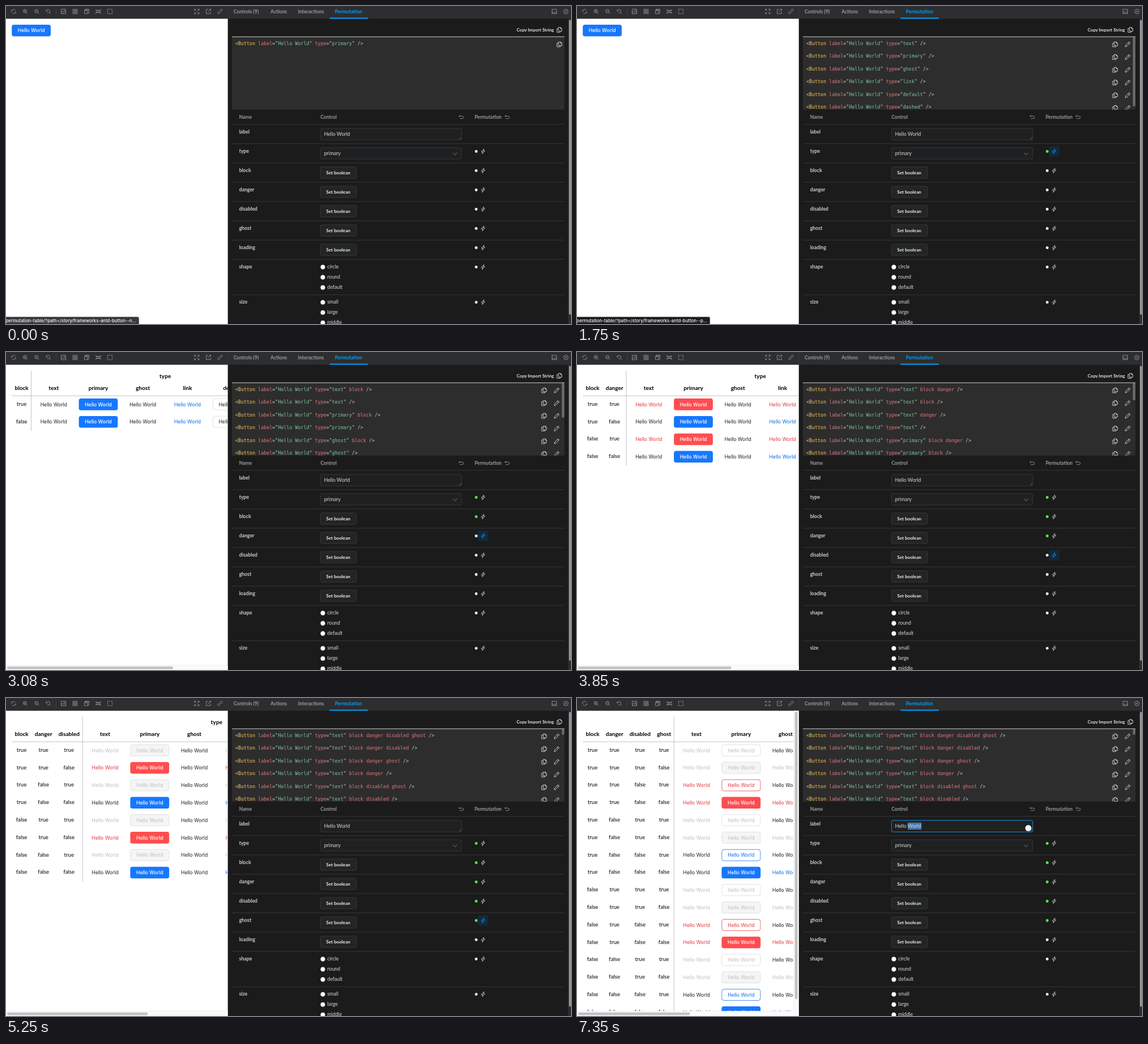
An HTML page that plays this animation: 998 px wide and 561 px high, repeating every 8000 ms.

```html
<!DOCTYPE html>
<html lang="en">
<head>
<meta charset="utf-8">
<title>Permutation table</title>
<style>
  html, body { margin: 0; height: 100%; overflow: hidden; background: #1b1b1b; }
  svg { display: block; }
  #stage { width: 100vw; height: 100vh; }
  text { white-space: pre; font-family: Lato, sans-serif; }
  .tab { font-size: 8.6px; font-weight: 700; fill: #9a9c9d; }
  .name { font-size: 8.8px; font-weight: 700; fill: #c9cccf; }
  .value { font-size: 8.75px; fill: #d8dadb; }
  .small { font-size: 8.1px; font-weight: 700; fill: #eeeeee; }
  .copy { font-size: 7.87px; font-weight: 700; fill: #e4e4e4; }
  .head { font-size: 10.15px; font-weight: 700; text-anchor: middle; }
  .cell { font-size: 9.7px; text-anchor: middle; }
  .button { font: 8.65px Inter, sans-serif; text-anchor: middle; }
  .code { font: 8.36px "DejaVu Sans Mono", monospace; fill: #cccccc; }
  .status { font: 500 7.75px Inter, sans-serif; fill: #ffffff; text-anchor: end; }
  .tag { fill: #f8c555; } .attr { fill: #e2777a; } .string { fill: #7ec699; }
</style>
</head>
<body>
<svg id="stage" viewBox="0 0 998 561" preserveAspectRatio="none">
  <g id="fixed"></g>
  <g id="live"></g>
</svg>
<script>
const LOOP = 8000;
const TYPES = ['text', 'primary', 'ghost', 'link', 'default', 'dashed'];
const FLAGS = ['block', 'danger', 'disabled', 'ghost'];
const ROWS = ['type', ...FLAGS, 'loading', 'shape', 'size'];
const BLUE = '#1677ff', RED = '#ff4d4f', LINK = '#0f6be6', ERROR = '#e03a3e';
const FAINT = '#bfbfbf', EDGE = '#d9d9d9', ACCENT = '#029cfd';

const ICONS = {
  sync: 'M-3.7-.6A3.7 3.7 0 0 1 2.9-2.3M3.7 .6A3.7 3.7 0 0 1-2.9 2.3M-4.6-1.8L-3.7-.4-2.2-1.2M4.6 1.8L3.7 .4 2.2 1.2',
  zoomIn: 'M2.3-.7A3 3 0 1 1-3.7-.7A3 3 0 1 1 2.3-.7M1.5 1.5L4 4M-2.2-.7H.8M-.7-2.2V.8',
  zoomOut: 'M2.3-.7A3 3 0 1 1-3.7-.7A3 3 0 1 1 2.3-.7M1.5 1.5L4 4M-2.2-.7H.8',
  zoomReset: 'M-3.6-1A3 3 0 1 1-2.2 1.9M1.5 1.5L4 4M-4.2-3.4V-.9H-1.7',
  image: 'M-4-4H4V4H-4ZM-4 2.5L-1.5-.3 .5 1.5 2 .3 4 2.2M1-2H2V-1H1Z',
  grid: 'M-3.9-3.9H-.8V-.8H-3.9ZM.8-3.9H3.9V-.8H.8ZM-3.9 .8H-.8V3.9H-3.9ZM.8 .8H3.9V3.9H.8Z',
  viewport: 'M-3-3.9H3.9V3H1.5M-3.9-1.5H1.4V3.9H-3.9ZM-3-3.9V-1.5M-3-2.8H3.9',
  measure: 'M-4-4V-1.6H4V-4M-4 4V1.4H4V4M-4-1.6H4M-4 1.4H4',
  expand: 'M-4-1.5V-4H-1.5M1.5-4H4V-1.5M4 1.5V4H1.5M-1.5 4H-4V1.5M-4-4L-1.2-1.2M4-4L1.2-1.2M4 4L1.2 1.2M-4 4L-1.2 1.2',
  share: 'M-.5-3.8H-3.8V3.8H3.8V.5M1.3-4H4V-1.3M4-4L-.8 .8',
  link: 'M-.6-1.8L1.2-3.6A1.7 1.7 0 0 1 3.6-1.2L1.8 .6M.6 1.8L-1.2 3.6A1.7 1.7 0 0 1-3.6 1.2L-1.8-.6M-1.4 1.4L1.4-1.4',
  panel: 'M-4-3.8H4V3.8H-4ZM-4 1.5H4',
  close: 'M4 0A4 4 0 1 1-4 0A4 4 0 1 1 4 0M-1.6-1.6L1.6 1.6M1.6-1.6L-1.6 1.6',
  copy: 'M-1.6-4.3H2L4.3-2V2.4H-1.6ZM2-4.3V-2H4.3M-1.6-2.2H-4.3V4.4H1.5V2.4',
  pencil: 'M-4.3 4.3L-3.6 1.5 2.4-4.4 4.4-2.4-1.5 3.6ZM1-3L3-1',
  bolt: 'M1.6-4.3L-3.2 .8H-.4L-1.6 4.3 3.2-.9H.4Z',
  undo: 'M-2-3.5L-3.9-1.6-2 .3M-3.9-1.6H1.8A2.2 2.2 0 0 1 1.8 2.8H-2.4',
  chevron: 'M-3.5-1.8L0 1.8 3.5-1.8'
};

const rect = (x, y, w, h, fill, more = '') =>
  `<rect x="${x}" y="${y}" width="${w}" height="${h}" fill="${fill}" ${more}/>`;
const text = (x, y, str, cls, more = '') =>
  `<text x="${x}" y="${y}" class="${cls}" ${more}>${str}</text>`;
const icon = (name, x, y, color = '#9a9c9d', weight = 0.85) =>
  `<path transform="translate(${x} ${y})" d="${ICONS[name]}" fill="none" stroke="${color}" stroke-width="${weight}"/>`;
const dot = (x, y, r, fill) => `<circle cx="${x}" cy="${y}" r="${r}" fill="${fill}"/>`;
const field = (y, w, h, fill, stroke = '#3d3d3d') =>
  rect(555.5, y, w, h, fill, `rx="2.5" stroke="${stroke}" stroke-width=".8"`);
const rowY = i => i < 7 ? 256.4 + 34 * i : 522.6;

function drawFixed() {
  let out = rect(392, 0, 606, 561, '#1b1b1b') + rect(0, 0, 998, 22.5, '#2c2e2f');

  const tools = { sync: 13.5, zoomIn: 34, zoomOut: 54.5, zoomReset: 75, image: 101.5, grid: 122,
    viewport: 142.5, measure: 163, expand: 337, share: 357.5, link: 378, panel: 968.5, close: 989 };
  for (const name in tools) out += icon(name, tools[name], 9.7);
  out += rect(88, 4, 0.7, 12, '#47494a');
  out += rect(179.5, 5.7, 8, 8, 'none', 'stroke="#9a9c9d" stroke-width=".9" stroke-dasharray="2 1"');
  out += rect(391.6, 0, 0.7, 22.5, '#3a3c3d');

  out += text(402, 12.6, 'Controls (9)', 'tab') + text(467.3, 12.6, 'Actions', 'tab') +
    text(515.8, 12.6, 'Interactions', 'tab') +
    text(581, 12.6, 'Permutation', 'tab', `style="fill:${ACCENT}"`) +
    rect(571.5, 20.5, 67.5, 2, ACCENT);

  out += text(902, 44.8, 'Copy Import String', 'copy') + icon('copy', 977.5, 42, '#e4e4e4');
  out += rect(399, 53.8, 587.5, 128.9, '#2d2d2d') + rect(399, 53.8, 587.5, 0.9, '#dddddd');

  out += text(411.7, 198.6, 'Name', 'tab') + text(555.5, 198.6, 'Control', 'tab') +
    text(827.7, 198.6, 'Permutation', 'tab') + icon('undo', 804, 195.8) + icon('undo', 885, 195.8);
  for (let i = 0; i < 8; i++) out += rect(399, 208.4 + 34.03 * i, 587.5, 0.8, '#3d3d3d');
  out += rect(399, 509, 587.5, 0.8, '#3d3d3d');

  out += text(411.7, 224.8, 'label', 'name');
  ROWS.forEach((name, i) => out += text(411.7, rowY(i) + 2.5, name, 'name'));

  out += field(250, 249.5, 20, '#1f2021') + text(561.7, 262.8, 'primary', 'value') +
    icon('chevron', 793.3, 260.8, '#8a8c8d', 0.9);
  for (let i = 1; i < 6; i++)
    out += field(rowY(i) - 6.4 - 34 + 34, 63.5, 20, '#222425') + text(565.5, rowY(i) + 6.5 - 2, '', 'small') +
      text(565.5, rowY(i) + 6.4, 'Set boolean', 'small');

  const radios = (y, names) => names.forEach((name, i) =>
    out += dot(559.6, y + 18 * i, 4.3, '#767676') + dot(559.6, y + 18 * i, 3.8, '#ffffff') +
      text(567.5, y + 18 * i + 2.7, name, 'value'));
  radios(460.6, ['circle', 'round', 'default']);
  radios(522.7, ['small', 'large', 'middle']);

  out += rect(993, 22.5, 5, 538.5, '#2d2f2f') + rect(994.6, 24.5, 3, 520, '#a6a6a6', 'rx="1.5"');
  return out;
}

// Every true/false combination of the first n flags, last flag changing fastest.
const combos = n => Array.from({ length: 2 ** n }, (_, row) =>
  FLAGS.slice(0, n).map((_, k) => !(row >> (n - 1 - k) & 1)));

function codeLine(type, flags, y) {
  const span = (cls, str) => `<tspan class="${cls}">${str}</tspan>`;
  const prop = (key, value) => ` ${span('attr', key)}="${span('string', value)}"`;
  const extras = flags.map(f => ' ' + span('attr', f)).join('');
  return text(405, y, `&lt;${span('tag', 'Button')}${prop('label', 'Hello World')}${prop('type', type)}${extras} /&gt;`, 'code');
}

function drawCode(count) {
  if (!count) return codeLine('primary', [], 68.8) + icon('copy', 977.5, 67.6, '#e4e4e4');
  const sets = combos(count - 1);
  const lines = TYPES.flatMap(type => sets.map(set => [type, FLAGS.filter((_, k) => set[k])]));
  let out = '';
  lines.slice(0, 6).forEach(([type, flags], i) => {
    const y = 22.45 * i;
    out += codeLine(type, flags, 68.8 + y - 54) +
      icon('copy', 950.5, 67.6 + y - 54, '#e4e4e4') + icon('pencil', 972.7, 67.6 + y - 54, '#e4e4e4');
  });
  const thumb = [0, 122, 60.5, 30, 10, 9.5][count];
  return `<svg y="54" width="998" height="128.7" overflow="hidden">${out}</svg>` +
    rect(981.8, 55, 4.4, thumb, '#6b6b6b', 'rx="1"');
}

function look(type, { danger, disabled, ghost }, ghostShown) {
  const color = disabled ? FAINT : danger ? ERROR : null;
  if (type === 'ghost') {
    if (!ghostShown || ghost) return { ink: '#1f1f1f' };
    type = 'link';
  }
  if (type === 'link') return { ink: color || LINK };
  if (type === 'text') return { ink: color || '#1f1f1f' };
  if (type !== 'primary') return { ink: color || '#1f1f1f', edge: EDGE, dashed: type === 'dashed' };
  if (disabled) return { ink: FAINT, edge: EDGE, fill: ghost ? 'none' : '#f5f5f5' };
  if (ghost) return { ink: color || LINK, edge: color || LINK };
  return { ink: '#ffffff', fill: danger ? RED : BLUE, bold: true };
}

function button(cx, cy, type, flags = {}, ghostShown = false) {
  const { ink, edge = 'none', fill = 'none', dashed, bold } = look(type, flags, ghostShown);
  const inset = edge === 'none' ? 0 : 0.35;
  const box = edge === 'none' && fill === 'none' ? '' :
    rect(cx - 34.4 + inset, cy - 10.3 + inset, 68.8 - 2 * inset, 20.6 - 2 * inset, fill,
      `rx="3.8" stroke="${edge}" stroke-width=".75" ${dashed ? 'stroke-dasharray="2 1.3"' : ''}`);
  return box + text(cx, cy + 3.1, 'Hello World', 'button', `fill="${ink}" ${bold ? 'font-weight="500" style="font-weight:500"' : ''}`);
}

function drawTable(n) {
  const line = [0, 44.5, 87, 135.3, 171.3][n];
  const flagX = [27.6, 66.2, 111.3, 153.7], pitch = 78.75, first = line + 39.8;
  const sets = combos(n);
  let out = rect(10.5, 76.8, 500, 0.8, '#b5b5b5') +
    rect(line - 0.4, 33, 0.8, 44.4 + 30.8 * sets.length, '#b5b5b5');
  for (let k = 0; k < n; k++) out += text(flagX[k], 67.4, FLAGS[k], 'head');
  out += text(first + 2.5 * pitch, 45.6, 'type', 'head');
  TYPES.forEach((type, c) => out += text(first + c * pitch, 67.4, type, 'head'));
  sets.forEach((set, r) => {
    const y = 92.4 + 30.8 * r;
    const flags = Object.fromEntries(set.map((on, k) => [FLAGS[k], on]));
    set.forEach((on, k) => out += text(flagX[k], y + 2.4, on, 'cell'));
    TYPES.forEach((type, c) => {
      const x = first + c * pitch;
      if (x < 430) out += button(x, y, type, flags, n === 4);
    });
  });
  return out;
}

function drawPreview(count) {
  const tall = count === 5, table = count > 1;
  let out = '';
  if (!count) out = button(44.6, 43.2, 'primary');
  else if (!table) TYPES.forEach((type, i) => out += button(44.6, 43.2 + 20.52 * i, type));
  else out = drawTable(count - 1);
  out = rect(0, 22.5, 391.8, 538.5, '#ffffff') +
    `<svg width="${tall ? 382.3 : 391.8}" height="${table ? 552.5 : 561}" overflow="hidden">${out}</svg>`;
  if (table) {
    const thumb = [293, 270.5, 248.5, 197.5][count - 2];
    out += rect(0, 552.5, 391.8, 8.5, '#fafafa') + rect(0, 552.3, 391.8, 0.6, '#e8e8e8') +
      rect(2, 554.8, thumb, 4.8, '#c1c1c1', 'rx="2.4"');
  }
  if (tall) out += rect(382.5, 22.5, 9.3, 530, '#fafafa') + rect(382.3, 22.5, 0.6, 530, '#e8e8e8') +
    rect(384.8, 24.5, 4.8, 507, '#c1c1c1', 'rx="2.4"');
  return out;
}

function drawSwitches(count, hover) {
  return ROWS.map((_, i) => {
    const y = rowY(i), on = i === hover;
    return (on ? rect(833.7, y - 9.2, 18.3, 18.2, '#14293a', 'rx="2.5"') : '') +
      dot(830.6, y + 0.1, 2.4, i < count ? '#4dff4d' : '#ffffff') +
      icon('bolt', 842.7, y, on ? ACCENT : '#d5d7d8');
  }).join('');
}

function drawLabelField(t) {
  const focus = Math.max(0, Math.min(1, (t - 6930 + 70) / 210));
  let out = field(216, 249.5, 20.3, '#1f2021');
  if (t >= 6930) out += `<g opacity="${focus.toFixed(2)}">${field(216, 249.5, 20.3, 'none', ACCENT)}</g>`;
  if (t >= 7140) out += rect(584.2, 219.8, 24.3, 12.4, '#4775ad');
  out += text(561.7, 228.8, 'Hello World', 'value');
  out += '<path d="M800.5 235L804 231.5M802.6 235L804 233.6" stroke="#8a8c8d" stroke-width=".6"/>';
  if (t >= 6930) out += dot(797.2, 229.6, 5.5, '#f2f4f6');
  return out;
}

function drawStatus(t) {
  const opacity = Math.max(0, Math.min(1, (2100 - t) / 280));
  if (!opacity) return '';
  const path = `n-permutation-table/?path=/story/frameworks-antd-button--${t < 350 ? 'n' : 'p'}...`;
  return `<g opacity="${opacity.toFixed(2)}">` +
    rect(-5, 548.5, 239.8, 18, t < 1260 ? '#38393b' : '#1c1d1f', 'rx="2.5" stroke="#77787a" stroke-width=".5"') +
    text(229.8, 557.7, path, 'status') + '</g>';
}

// Value of the last [time, value] step reached.
const at = (steps, t) => steps.reduce((value, [time, next]) => t >= time ? next : value, steps[0][1]);
const CODE = [[0, 0], [1750, 1], [2660, 2], [3640, 3], [4410, 4], [5250, 5]];
const VIEW = [[0, 0], [1820, 1], [2660, 2], [3710, 3], [4480, 4], [5320, 5]];
const HOVER = [[0, -1], [1400, 0], [1890, -1], [2240, 1], [3010, -1], [3080, 2],
  [3780, -1], [3850, 3], [4480, -1], [4550, 4], [6300, -1]];

const live = document.getElementById('live');
document.getElementById('fixed').innerHTML = drawFixed();
let shown = '';

function frame() {
  const t = performance.now() % LOOP;
  const count = at(CODE, t);
  const picture = drawPreview(at(VIEW, t)) + drawCode(count) +
    drawSwitches(count, at(HOVER, t)) + drawLabelField(t) + drawStatus(t);
  if (picture !== shown) live.innerHTML = shown = picture;
  requestAnimationFrame(frame);
}
frame();
</script>
</body>
</html>
```
